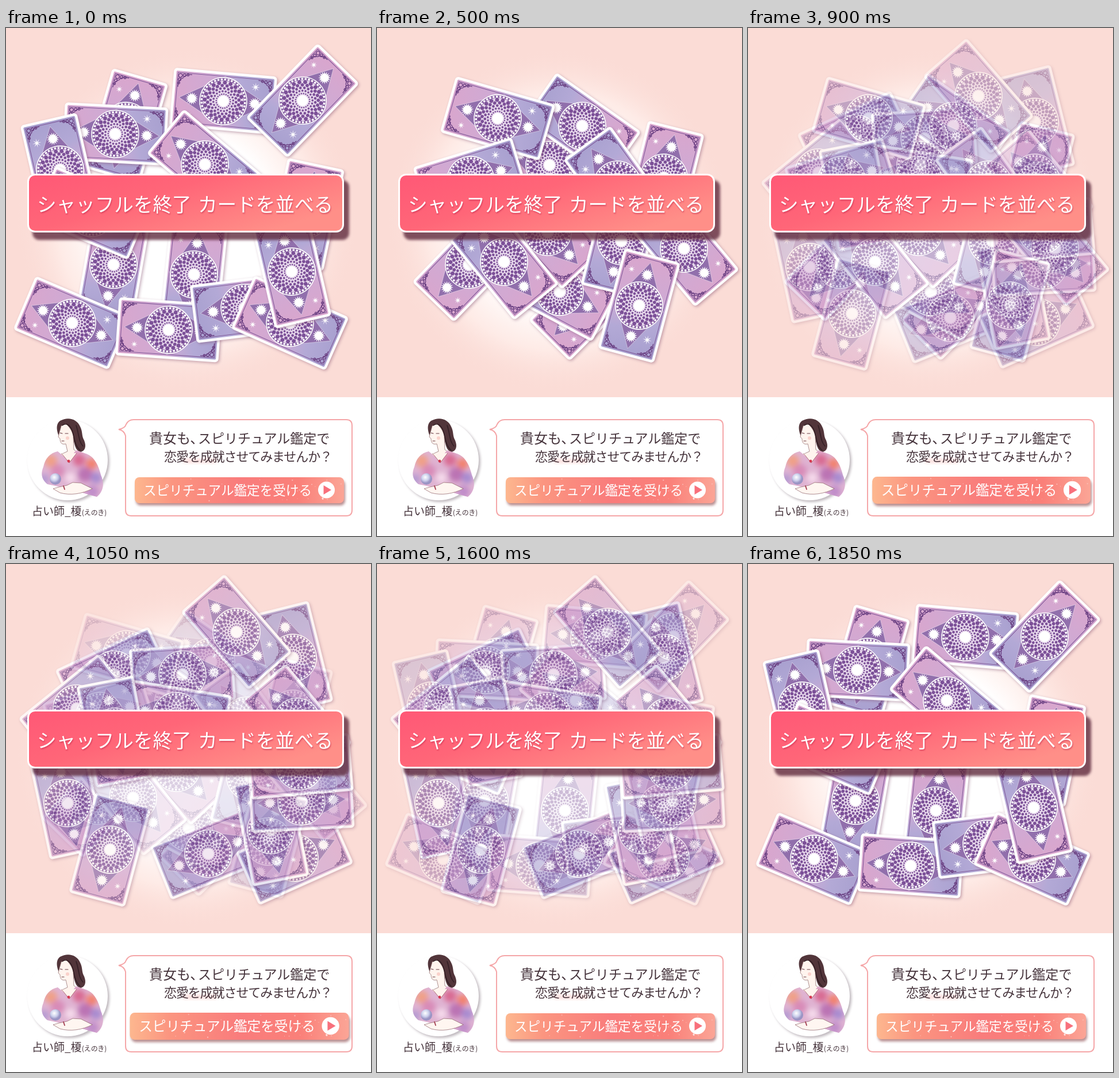
An HTML page with a canvas for the animation above (2 s loop, 635 px wide and 882 px high).

```html
<!DOCTYPE html>
<html lang="ja">
<head>
<meta charset="utf-8">
<title>カードシャッフル</title>
<style>
html, body { margin: 0; width: 100%; height: 100%; overflow: hidden; background: #fff; }
canvas, svg { position: absolute; left: 0; top: 0; display: block; }
text { font-family: "Noto Sans CJK JP", "Noto Sans CJK", sans-serif; font-weight: 300; fill: #46343c; }
.white text { fill: #fff; }
.banner text { font-size: 33.6px; filter: drop-shadow(1px 2px 1px rgba(190, 40, 75, .55)); }
</style>
</head>
<body>
<canvas id="table" width="635" height="641"></canvas>
<svg width="635" height="882" viewBox="0 0 635 882">
  <defs>
    <linearGradient id="red" x1="0" y1="0" x2="1" y2=".6">
      <stop offset="0" stop-color="#ff5876"/><stop offset=".45" stop-color="#ff6678"/><stop offset="1" stop-color="#ff8f88"/>
    </linearGradient>
    <linearGradient id="coral">
      <stop offset="0" stop-color="#fdb78f"/><stop offset=".18" stop-color="#fb9580"/><stop offset=".5" stop-color="#f97c7c"/>
      <stop offset=".78" stop-color="#fa8079"/><stop offset="1" stop-color="#fba596"/>
    </linearGradient>
    <radialGradient id="ball" cx=".4" cy=".35">
      <stop offset="0" stop-color="#fff"/><stop offset=".6" stop-color="#ccd0ec"/><stop offset="1" stop-color="#9a94c4"/>
    </radialGradient>
    <filter id="soft" x="-30%" y="-30%" width="160%" height="160%"><feGaussianBlur stdDeviation="2"/></filter>
    <filter id="wash" x="-50%" y="-50%" width="200%" height="200%"><feGaussianBlur stdDeviation="5"/></filter>
    <clipPath id="shawl"><path d="M90 735C76 738 68 748 65 762C60 774 62 784 72 792L108 800L158 814C169 805 172 792 165 776C160 756 152 742 136 738L122 733L108 750Z"/></clipPath>
  </defs>

  <g class="banner white">
    <rect x="46" y="264" width="551" height="104" rx="12" fill="#5e2c3e" opacity=".8" filter="url(#soft)"/>
    <rect x="38.5" y="254.5" width="548" height="99" rx="12" fill="url(#red)" stroke="#fff" stroke-width="3"/>
    <text x="54" y="319">シャッフルを終了</text>
    <text x="334" y="319">カードを並べる</text>
  </g>

  <g id="portrait" stroke-linecap="round" stroke-linejoin="round">
    <circle cx="110" cy="753" r="70" fill="#6b5a66" opacity=".42" filter="url(#soft)"/>
    <circle cx="107" cy="750" r="70" fill="#fff"/>
    <path d="M94 682C108 674 124 679 129 692C134 702 131 708 136 716C140 726 138 734 130 736C121 735 119 722 117 713L107 691C98 692 94 699 93 711C88 700 86 688 94 682Z" fill="#52353a"/>
    <path d="M96 691C94 699 92 704 91 710L94 713C94 720 97 724 104 722L107 735L92 742L112 762L126 738L118 732L117 708C115 699 110 692 104 687Z" fill="#fff4ee" stroke="#8a6365" stroke-width=".7"/>
    <path d="M98 690C104 685 112 688 116 702C119 712 120 726 129 733M122 690C127 704 126 718 134 726" fill="none" stroke="#2f1c22" stroke-width="1.4"/>
    <path d="M94 703l4 1M103 704l5 0M97 717l4 0" stroke="#6a3c44" stroke-width="1.1"/>
    <circle cx="107" cy="712" r="3" fill="#f6b9b2" opacity=".6"/>
    <g clip-path="url(#shawl)">
      <rect x="55" y="725" width="125" height="95" fill="#dfb3d2"/>
      <g filter="url(#wash)">
        <circle cx="78" cy="752" r="11" fill="#f0a086"/><circle cx="90" cy="769" r="12" fill="#d88bb8"/>
        <circle cx="127" cy="750" r="11" fill="#d86a92"/><circle cx="149" cy="757" r="10" fill="#f3826c"/>
        <circle cx="138" cy="775" r="13" fill="#bb73b4"/><circle cx="157" cy="781" r="10" fill="#a78bd0"/>
        <circle cx="66" cy="784" r="10" fill="#b79bd2"/><circle cx="150" cy="805" r="11" fill="#c08cc9"/>
        <circle cx="112" cy="781" r="9" fill="#f6dcec"/>
      </g>
    </g>
    <path d="M97 739L110 755L123 738" fill="#fff4ee" stroke="#a35a63" stroke-width=".8"/>
    <circle cx="109" cy="752" r="2.4" fill="#d6364f"/>
    <path d="M150 800C132 809 112 812 94 807L82 800L92 797L106 794L116 789L130 790Z" fill="#fff6f1" stroke="#9a7076" stroke-width=".8"/>
    <path d="M100 795l2 6" stroke="#a13d50" stroke-width="1.8"/>
    <circle cx="86" cy="783" r="10" fill="url(#ball)"/>
  </g>
  <text x="45" y="846" font-size="19">占い師_榎<tspan font-size="12">(えのき)</tspan></text>

  <path d="M222 680H592Q602 680 602 690V837Q602 847 592 847H218Q208 847 208 837V708Q206 699 196 697Q207 695 209 688Q213 680 222 680Z" fill="#fff" stroke="#f5a6a8" stroke-width="2"/>
  <rect x="308" y="747" width="58" height="9" fill="#fbd3d0" opacity=".6" filter="url(#soft)"/>
  <text x="249" y="721" font-size="24">貴女も、</text>
  <text x="334" y="721" font-size="23">スピリチュアル鑑定で</text>
  <text x="275" y="752" font-size="22" letter-spacing="-1.1">恋愛を成就させてみませんか？</text>

  <g id="button" class="white">
    <rect x="226" y="785" width="364" height="44" rx="8" fill="#9a5f62" opacity=".7" filter="url(#soft)"/>
    <rect x="224" y="780" width="364" height="45" rx="8" fill="url(#coral)"/>
    <g id="sparks" fill="#fff"></g>
    <text x="239" y="810.5" font-size="22.6">スピリチュアル鑑定を受ける</text>
    <circle cx="557.5" cy="802" r="14.5" fill="#fff"/>
    <path d="M552.5 794L566 802L552.5 810Z" fill="#f8707c"/>
  </g>
</svg>
<script>
const W = 635, H = 641, TAU = Math.PI * 2, LOOP = 2000, STEP = 50;

// Each card: centre x, centre y, direction of its pink end in degrees; back to front.
const poses = [
  [[209,170,16], [378,127,-85], [190,184,-87], [346,237,-50], [516,126,44], [94,246,167],
   [521,324,12], [187,411,10], [149,321,-67], [115,512,-67], [327,428,6], [283,524,-86],
   [415,486,83], [494,512,-66], [497,423,167]],
  [[300,238,-70], [357,170,125], [210,157,-74], [163,264,-107], [499,260,14], [418,272,144],
   [160,411,-136], [363,479,-135], [318,458,118], [297,354,137], [221,406,141], [425,370,14],
   [534,383,140], [456,482,15]],
  [[499,163,166], [188,192,-115], [307,192,86], [123,251,-129], [296,264,-81], [401,118,-41],
   [506,274,-40], [189,291,169], [107,415,168], [181,496,195], [352,503,68], [502,510,66],
   [461,462,169], [514,412,87], [511,351,-95]]
];
// From pose, to pose, start in ms, number of steps.
const fades = [[2, 0, -500, 8], [0, 1, 250, 6], [1, 2, 700, 11], [2, 0, 1500, 8]];

function disc(c, x, y, r, color) {
  c.fillStyle = color;
  c.beginPath();
  c.arc(x, y, r, 0, TAU);
  c.fill();
}

function ring(c, r, width, color) {
  c.strokeStyle = color;
  c.lineWidth = width;
  c.beginPath();
  c.arc(0, 0, r, 0, TAU);
  c.stroke();
}

function beads(c, n, r, size, shift, color) {
  for (let i = 0; i < n; i++) {
    const a = (i + shift) / n * TAU;
    disc(c, r * Math.cos(a), r * Math.sin(a), size, color);
  }
}

function burst(c, x, y, points, outer, inner) {
  c.fillStyle = '#fff';
  c.beginPath();
  for (let i = 0; i < points * 2; i++) {
    const r = i % 2 ? inner : outer, a = i / points * Math.PI;
    c.lineTo(x + r * Math.sin(a), y - r * Math.cos(a));
  }
  c.fill();
}

function corner(c, sx, sy) {
  c.save();
  c.scale(sx, sy);
  c.strokeStyle = '#6a3f82';
  c.lineWidth = 1.3;
  c.beginPath();
  for (const [x, y, r] of [[38,78,3.2], [31,79,2.4], [25,80,1.9], [39,71,2.4], [40,65,1.9]]) {
    c.moveTo(x + r, y);
    c.arc(x, y, r, 0, TAU);
  }
  c.moveTo(18, 81);
  c.quadraticCurveTo(32, 81, 34, 73);
  c.moveTo(41, 58);
  c.quadraticCurveTo(41, 70, 34, 73);
  c.stroke();
  c.restore();
}

function card(c, [x, y, deg]) {
  c.save();
  c.translate(x, y);
  c.rotate(deg * Math.PI / 180);

  c.save();
  c.shadowColor = 'rgba(130,80,110,.45)';
  c.shadowBlur = 5;
  c.shadowOffsetX = c.shadowOffsetY = 2;
  c.fillStyle = '#fff';
  c.beginPath();
  c.roundRect(-50.5, -90, 101, 180, 6);
  c.fill();
  c.restore();

  const tone = c.createLinearGradient(-20, -86, 20, 86);
  tone.addColorStop(0, '#d9a6cd');
  tone.addColorStop(.45, '#cfaad4');
  tone.addColorStop(.7, '#b3a9d6');
  tone.addColorStop(1, '#a8a0cf');
  c.fillStyle = tone;
  c.beginPath();
  c.roundRect(-46, -85.5, 92, 171, 2);
  c.fill();
  c.strokeStyle = '#7d5596';
  c.lineWidth = 1;
  c.strokeRect(-43, -82.5, 86, 165);
  for (const sx of [-1, 1]) for (const sy of [-1, 1]) corner(c, sx, sy);

  c.fillStyle = '#916fac';
  c.strokeStyle = 'rgba(255,255,255,.4)';
  c.beginPath();
  for (const [px, py] of [[0, -77], [43, 0], [0, 77], [-43, 0]]) c.lineTo(px, py);
  c.closePath();
  c.fill();
  c.stroke();

  disc(c, 0, 0, 41, '#8a62a4');
  ring(c, 41, 1.6, '#fff');
  beads(c, 40, 37.8, 1.9, 0, '#fff');
  disc(c, 0, 0, 35.5, '#e7d8ec');
  for (let k = 0; k < 5; k++) {
    const r = 32.3 - k * 5;
    beads(c, 20, r, r * .105, k % 2 / 2, '#7c5098');
  }
  disc(c, 0, 0, 9.5, '#fff');

  for (const s of [-1, 1]) {
    burst(c, 0, s * 55, 16, 11, 6.5);
    disc(c, 0, s * 55, 6.5, '#fff');
  }
  burst(c, 29, 54, 8, 8, 2);
  burst(c, -29, -58, 8, 6, 1.8);
  c.restore();
}

function layer(cards) {
  const canvas = document.createElement('canvas');
  canvas.width = W;
  canvas.height = H;
  const c = canvas.getContext('2d');
  c.fillStyle = '#fbdcd6';
  c.fillRect(0, 0, W, H);
  const glow = c.createRadialGradient(315, 335, 0, 315, 335, 300);
  glow.addColorStop(0, '#fff');
  glow.addColorStop(.5, '#fff');
  glow.addColorStop(.75, 'rgba(255,240,236,.75)');
  glow.addColorStop(1, 'rgba(251,220,214,0)');
  c.fillStyle = glow;
  c.fillRect(0, 0, W, H);
  cards.forEach(item => card(c, item));
  return canvas;
}

function addSparks() {
  let seed = 7;
  const rnd = () => (seed = seed * 16807 % 2147483647) / 2147483647;
  let dots = '';
  for (let i = 0; i < 38; i++) {
    const x = 300 + rnd() * 284, y = 783 + rnd() * 39;
    dots += `<circle cx="${x.toFixed(1)}" cy="${y.toFixed(1)}" r="${(.5 + rnd()).toFixed(1)}" opacity="${(.2 + rnd() * .4).toFixed(2)}"/>`;
  }
  document.getElementById('sparks').innerHTML = dots;
}

const table = document.getElementById('table').getContext('2d');
const button = document.getElementById('button');
const layers = poses.map(layer);
addSparks();

function draw(time) {
  const t = Math.floor(time % LOOP / STEP) * STEP;
  const [from, to, start, steps] = fades.filter(f => f[2] <= t).pop();
  const mix = Math.min(1, ((t - start) / STEP + 1) / steps);
  table.globalAlpha = 1;
  table.drawImage(layers[from], 0, 0);
  table.globalAlpha = mix;
  table.drawImage(layers[to], 0, 0);

  const pulse = t > 650 && t < 1350 ? Math.sin((t - 650) / 700 * Math.PI) : 0;
  const scale = 1 + .048 * pulse;
  button.setAttribute('transform', `translate(406 802.5) scale(${scale}) translate(-406 -802.5)`);
}

const begin = performance.now();
function tick() {
  draw(performance.now() - begin);
  requestAnimationFrame(tick);
}
tick();
</script>
</body>
</html>
```
